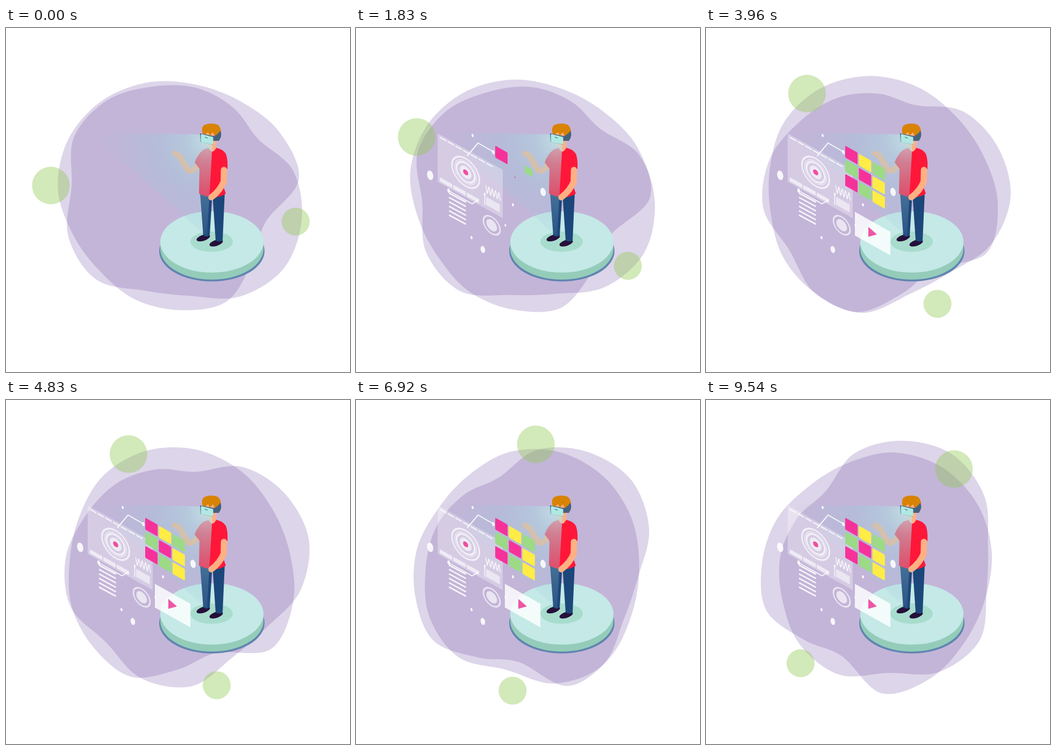
An HTML page that plays this animation: 640 px wide and 640 px high, repeating every 9580 ms.

```html
<!DOCTYPE html>
<html lang="en">
<head>
<meta charset="utf-8">
<title>VR scene</title>
<style>
  html, body { margin: 0; width: 100%; height: 100%; overflow: hidden; background: #fff; }
  svg { display: block; width: 100%; height: 100%; }
</style>
</head>
<body>
<svg viewBox="0 0 640 640">
  <defs>
    <radialGradient id="glow" gradientUnits="userSpaceOnUse" cx="374" cy="208" r="215">
      <stop offset="0" stop-color="#c4eaea" stop-opacity=".75"/>
      <stop offset=".2" stop-color="#a9d6de" stop-opacity=".54"/>
      <stop offset=".5" stop-color="#98c8da" stop-opacity=".3"/>
      <stop offset="1" stop-color="#a8c0da" stop-opacity="0"/>
    </radialGradient>
  </defs>

  <g fill="#6e4ca1" fill-opacity=".237">
    <path id="blobA"/>
    <path id="blobB"/>
  </g>
  <g fill="#90c750" fill-opacity=".4">
    <circle id="orbA" r="35"/>
    <circle id="orbB" r="26"/>
  </g>

  <g id="platform">
    <ellipse cx="383" cy="415" rx="98" ry="56.5" fill="#6085b0"/>
    <path d="M287 398V411A96 57 0 0 0 479 411V398Z" fill="#94ccb9"/>
    <ellipse cx="383" cy="398" rx="96" ry="57" fill="#c4e9e7"/>
    <ellipse cx="382.5" cy="397.5" rx="39.5" ry="19" fill="#a8dccd"/>
  </g>

  <g id="man">
    <g fill="#25103a">
      <ellipse cx="367" cy="390.5" rx="13" ry="5.5" transform="rotate(-18 367 390.5)"/>
      <ellipse cx="391" cy="400" rx="13" ry="5.5" transform="rotate(-18 391 400)"/>
    </g>
    <path d="M361 306H384L379 386Q373 390 367 386ZM384 306H407L403 396Q396 399 390 395Z" fill="#1c477a"/>
    <g fill="none" stroke="#ffb083" stroke-linecap="round" stroke-linejoin="round">
      <path d="M360 253Q344 272 337 262L322 237" stroke-width="11"/>
      <path d="M314 233L322 238" stroke-width="10"/>
    </g>
    <path d="M377 208H391V224Q386 232 377 228Z" fill="#ffb083"/>
    <path d="M377 223Q384 237 391 223Q403 225 409 234Q413 244 412 262Q406 266 400 264L402 288L409 308Q400 315 386 315Q370 314 359 308L360 262L351 250Q357 234 368 226Z" fill="#ff1739"/>
    <path d="M405.500 264L405 286Q398 303 382 315" fill="none" stroke="#ffb083" stroke-width="11.500" stroke-linecap="round"/>
    <path d="M367 190H395V206Q391 217 380 218H372Q366 205 367 190Z" fill="#ffb083"/>
    <path d="M365 194Q363 181 373 179Q384 176 394 180Q402 186 399 199L390 206L385 194L379 200L376 194L368 200Z" fill="#d98304"/>
  </g>

  <path d="M158 194L366 198L384 217L374 388L352 369Z" fill="url(#glow)"/>

  <g id="headset">
    <path d="M361 196L387 201Q393 199 399 191Q403 201 396 210L385 210V217L362 212Z" fill="#46627f"/>
    <path d="M364 199L384 204V215L364 211Z" fill="#b0e8e3" stroke="#b0e8e3" stroke-width="3" stroke-linejoin="round"/>
    <path d="M370 203L375 205" stroke="#5a8a9a" stroke-width="1.5"/>
  </g>

  <g id="hud"></g>
</svg>

<script>
const LOOP = 9580;
const $ = id => document.getElementById(id);
const hud = $('hud');
const pops = [];

// Smooth closed curve through radii spread evenly around a centre
function blob(cx, cy, first, radii) {
  const n = radii.length;
  const at = i => {
    const a = (first + i * 360 / n) * Math.PI / 180, r = radii[(i + n) % n];
    return [cx + r * Math.cos(a), cy + r * Math.sin(a)];
  };
  let d = 'M' + at(0);
  for (let i = 0; i < n; i++) {
    const [a, b, c, e] = [at(i - 1), at(i), at(i + 1), at(i + 2)];
    const c1 = b.map((v, k) => v + (c[k] - a[k]) / 6);
    const c2 = c.map((v, k) => v - (e[k] - b[k]) / 6);
    d += `C${c1} ${c2} ${c}`;
  }
  return d + 'Z';
}

// Adds a piece that grows around (x, y) from the given time
function pop(start, x, y, markup) {
  const g = document.createElementNS('http://www.w3.org/2000/svg', 'g');
  g.innerHTML = markup;
  hud.append(g);
  pops.push({ g, start, x, y });
}

// Wraps markup in the slanted plane of the panels
const slant = (x, y, markup) => `<g transform="matrix(1 .56 0 1 ${x} ${y})">${markup}</g>`;
const rect = (w, h, o, y = 0, x = 0) => `<rect x="${x}" y="${y}" width="${w}" height="${h}" fill="#fff" fill-opacity="${o}"/>`;
const line = (d, w) => `<path d="${d}" fill="none" stroke="#fff" stroke-opacity=".88" stroke-width="${w}"/>`;
const ring = (r, w) => `<circle r="${r}" fill="none" stroke="#fff" stroke-width="${w}" stroke-opacity=".68"/>`;
const disc = (r, fill, o = 1) => `<circle r="${r}" fill="${fill}" fill-opacity="${o}"/>`;
const dot = (x, y, r) => `<ellipse cx="${x}" cy="${y}" rx="${r * .62}" ry="${r}" transform="rotate(-14 ${x} ${y})" fill="#fff" fill-opacity=".87"/>`;

function buildHud() {
  let clock = 150;
  const next = (x, y, markup) => pop(clock += 70, x, y, markup);

  next(212, 275, slant(152, 196, rect(121, 90, .3)));
  next(204, 231, slant(152, 196, '<path d="M4 5H102" stroke="#fff" stroke-opacity=".8" stroke-width="2.5" stroke-dasharray="12 2.4"/>'));
  next(192, 299, slant(152, 196, [0, 1, 2].map(i => rect(23, 7.5, .6, 79.5, 4 + 25 * i)).join('')));
  next(204, 269, slant(204, 268.5, ring(25.5, 3) + ring(20.5, 1.2) + ring(17, 3.5) + disc(11, '#fff', .6) + disc(4.8, '#ee4f9f')));
  next(231, 226, line('M207 238L227 214L255 230', 2) + dot(255.5, 231, 3.8));

  let wave = 'M';
  for (let x = 0; x <= 28; x += .5) wave += `${x} ${-6.5 * Math.cos(x / 28 * Math.PI * 9)} `;
  next(255, 308, slant(241, 299, line(wave, 1.5)));
  next(253, 326, line('M239.5 309V329', 1.5) + dot(239.5, 309, 2.5) + slant(242, 314, rect(25.5, 15, .5)));
  next(200, 314, line('M173 303L216 327L228 320', 2) + dot(172.5, 302.5, 4));

  for (let y = 307; y < 350; y += 8.2) next(189, y + 8, line(`M173 ${y}l31.5 17`, 2.6));
  next(253, 367, slant(252.5, 367, ring(15.5, 2.6) + disc(10, '#fff', .65)));

  for (const [x, y, r] of [[138, 274, 9], [217, 200, 3], [348, 305, 7.8], [292, 329, 3], [278, 367, 2.5], [215, 390, 3], [236, 412, 6.6]])
    pop(300 + y * 2, x, y, dot(x, y, r));

  // Tiles appear in two checkerboard passes
  const shade = { p: '#f6329a', y: '#ffec45', g: '#9cda86' };
  [...'pyggpypgy'].forEach((c, i) => {
    const col = i % 3, row = Math.floor(i / 3), order = i % 2 ? 5 + (i >> 1) : i / 2;
    const x = 259 + col * 25.4, y = 219 + col * 15 + row * 26.2;
    pop(1530 + order * 140, x + 11.5, y + 17.5, slant(x, y, `<rect width="23" height="22" rx="1.5" fill="${shade[c]}"/>`));
  });

  pop(2650, 310, 382, slant(277, 342, rect(66, 44, .82)) + '<path d="M302 370L318 384L302 388.5Z" fill="#ee57a5"/>');
}

function place(orb, radius, deg) {
  const a = deg * Math.PI / 180;
  orb.setAttribute('cx', 320 + radius * Math.cos(a));
  orb.setAttribute('cy', 320 + radius * Math.sin(a));
}

function draw(t) {
  const turn = t * .01257;
  place($('orbA'), 238, 186.5 + turn);
  place($('orbB'), 222.6, 10.4 + turn);

  const swing = 95 * (1 - Math.cos(Math.PI * t / LOOP)) / 2;
  $('blobA').setAttribute('transform', `rotate(${swing} 315 314)`);
  $('blobB').setAttribute('transform', `rotate(${-swing} 329 301)`);

  for (const { g, start, x, y } of pops) {
    const s = Math.min(1, Math.max(0, (t - start) / 260));
    g.setAttribute('transform', `translate(${x} ${y}) scale(${s}) translate(${-x} ${-y})`);
  }
}

$('blobA').setAttribute('d', blob(315, 314, -8, [232, 174, 187, 217, 211, 205, 197, 203, 219, 226, 225, 219, 212, 215, 228]));
$('blobB').setAttribute('d', blob(329, 301, 14, [228, 238, 225, 198, 200, 232, 230, 207, 225, 218, 200, 191, 179, 169, 208]));
buildHud();

const begin = performance.now();
function tick() {
  draw((performance.now() - begin) % LOOP);
  requestAnimationFrame(tick);
}
tick();
</script>
</body>
</html>
```
